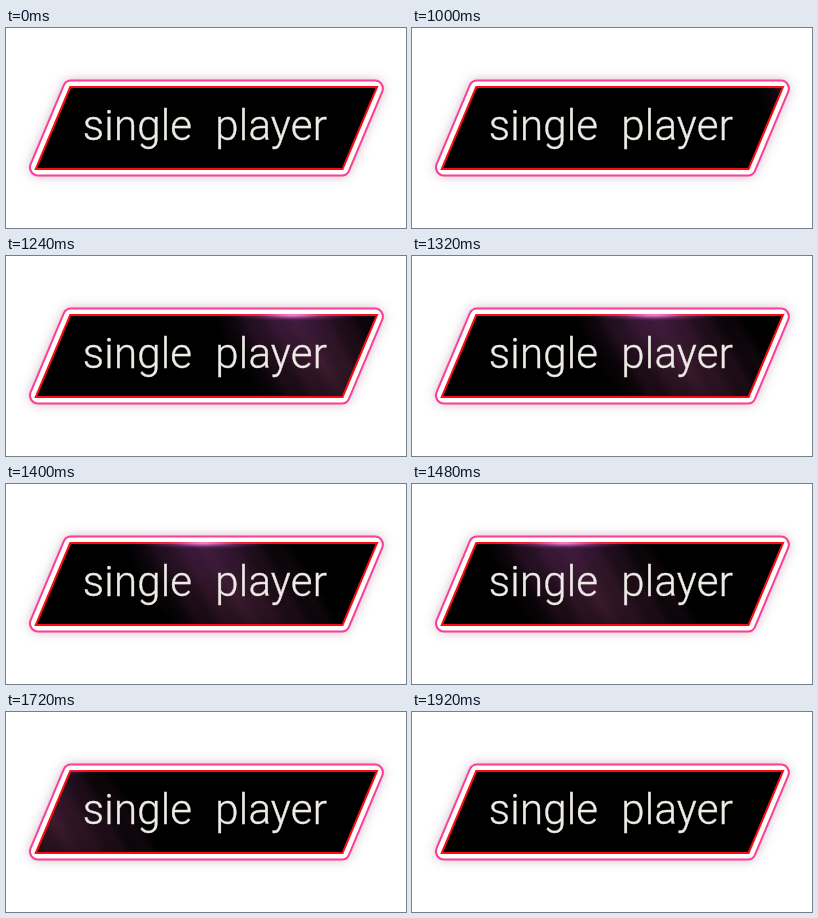
Write an HTML page with a canvas that moves like this. It is 400x200 px and loops after 3840 ms.

```html
<!DOCTYPE html>
<html lang="en">
<head>
<meta charset="utf-8">
<title>single player</title>
<style>
  html, body { margin: 0; width: 100%; height: 100%; overflow: hidden; background: #fff; }
  canvas { display: block; width: 400px; height: 200px; }
</style>
</head>
<body>
<canvas id="stage" width="400" height="200"></canvas>
<script>
const ctx = document.getElementById('stage').getContext('2d');
const LOOP = 3840, STEP = 40, SWEEP_START = 1000, SWEEP_END = 1920;
const CENTER_X = 200.4, CENTER_Y = 100, TOP = 58;
const PANEL_LEAN = 0.42, BEAM_LEAN = 0.6;

// Traces the slanted panel, grown by pad on every side.
function slantedPath(pad, radius = 0) {
  const halfW = 153.4 + pad * 1.1, halfH = 41 + pad;
  const corner = (sx, sy) =>
    [CENTER_X + sx * halfW - sy * PANEL_LEAN * halfH, CENTER_Y + sy * halfH];
  const corners = [corner(-1, -1), corner(1, -1), corner(1, 1), corner(-1, 1)];
  ctx.beginPath();
  ctx.moveTo(CENTER_X, CENTER_Y - halfH);
  for (let i = 1; i <= 4; i++) {
    ctx.arcTo(...corners[i % 4], ...corners[(i + 1) % 4], radius);
  }
  ctx.closePath();
}

// Soft ellipse of light that fades to nothing at its edge.
function glow(x, y, rx, ry, rgb, alpha) {
  ctx.save();
  ctx.translate(x, y);
  ctx.scale(rx, ry);
  const fade = ctx.createRadialGradient(0, 0, 0, 0, 0, 1);
  for (let r = 0; r <= 1; r += 0.25) {
    fade.addColorStop(r, `rgba(${rgb},${alpha * (1 - r) ** 1.3})`);
  }
  ctx.fillStyle = fade;
  ctx.fillRect(-1, -1, 2, 2);
  ctx.restore();
}

function drawBeam(x) {
  ctx.save();
  ctx.transform(1, 0, BEAM_LEAN, 1, x - BEAM_LEAN * TOP, 0);
  glow(0, 105, 90, 130, '95,42,75', 0.6);
  for (let offset = -50; offset <= 75; offset += 25) {
    glow(offset, 110, 15, 100, '105,45,80', 0.12);
  }
  ctx.restore();
  glow(x, TOP, 75, 55, '110,45,125', 0.4);
}

function drawFlare(x) {
  glow(x, TOP + 1, 70, 6, '225,85,190', 0.75);
  glow(x, TOP + 1, 32, 4, '255,160,240', 0.7);
}

function drawClipped(pad, paint, x) {
  ctx.save();
  slantedPath(pad);
  ctx.clip();
  paint(x);
  ctx.restore();
}

function drawWord(word, x) {
  ctx.fillText(word, x, 112);
  ctx.strokeText(word, x, 112);
}

function draw(time) {
  const t = Math.floor((time % LOOP) / STEP) * STEP;
  const lit = t >= SWEEP_START && t < SWEEP_END;
  const x = 421 - 0.56 * (t - SWEEP_START);

  ctx.fillStyle = '#fff';
  ctx.fillRect(0, 0, 400, 200);

  ctx.save();
  ctx.shadowColor = 'rgba(120,50,85,.38)';
  ctx.shadowBlur = 12;
  slantedPath(6.5, 8);
  ctx.fill();
  ctx.restore();
  ctx.lineWidth = 2;
  ctx.strokeStyle = '#fa3f94';
  ctx.stroke();

  slantedPath(0);
  ctx.fillStyle = '#000';
  ctx.fill();
  if (lit) drawClipped(0, drawBeam, x);
  slantedPath(0);
  ctx.strokeStyle = '#fa0c10';
  ctx.stroke();
  if (lit) drawClipped(1, drawFlare, x);

  ctx.font = '300 42px Roboto, sans-serif';
  ctx.letterSpacing = '0.2px';
  ctx.fillStyle = ctx.strokeStyle = '#efece7';
  ctx.lineWidth = 0.4;
  drawWord('single', 76.8);
  drawWord('player', 209.3);
}

function tick() {
  draw(performance.now());
  requestAnimationFrame(tick);
}
tick();
</script>
</body>
</html>
```
